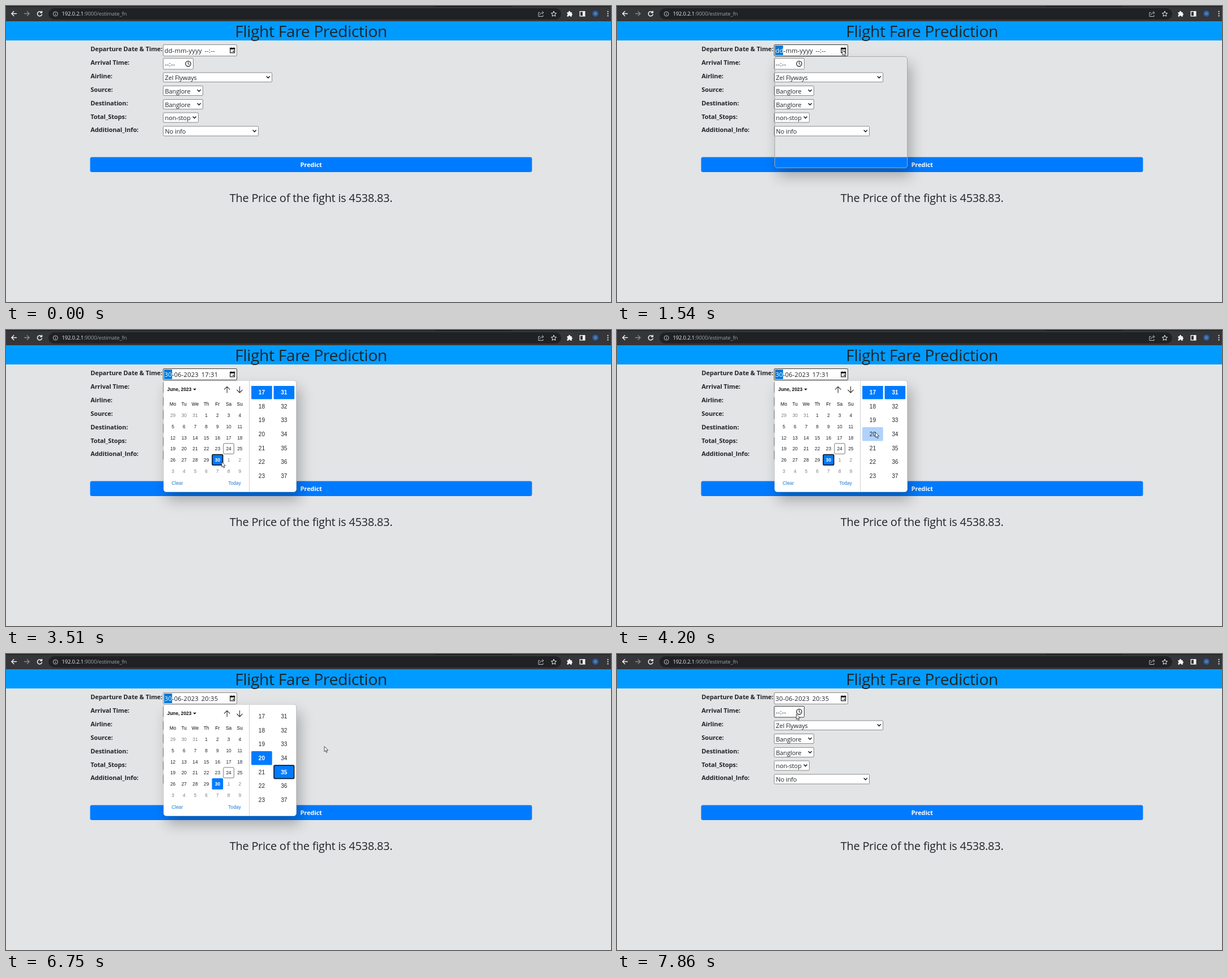
An HTML page for the animation above (8000 ms loop, 1068 by 524 pixels).

```html
<!DOCTYPE html>
<html lang="en">
<head>
<meta charset="utf-8">
<title>Flight Fare Prediction</title>
<style>
  html, body { margin: 0; width: 100%; height: 100%; overflow: hidden; background: #e3e4e6; }
  svg { display: block; width: 1068px; height: 524px; }
  text { font: 11px "Open Sans", "Noto Sans", sans-serif; letter-spacing: -.012em; fill: #212529; white-space: pre; }
  .bold { font-weight: 700; }
  .mid { text-anchor: middle; }
  .title { font-size: 28.2px; }
  .result { font-size: 19.9px; }
  .url { font-size: 9.5px; letter-spacing: -.02em; fill: #e8eaed; }
  .date { font-size: 11.2px; letter-spacing: .015em; }
  .cal { font: 8.4px "Liberation Sans", Arial, sans-serif; letter-spacing: 0; fill: #101010; }
  .time { font-size: 10px; }
  .cal.bold { font-weight: 700; }
  .line { fill: none; stroke-linecap: round; stroke-linejoin: round; }
  .panel { box-sizing: border-box; margin: 40px; width: 235px; height: 198px; border: 1px solid #a9a9a9;
           border-radius: 5px; box-shadow: 6px 14px 24px rgba(0, 0, 0, .27); }
</style>
</head>
<body>
<svg viewBox="0 0 1068 524">
  <defs>
    <clipPath id="lists"><rect x="430" y="99" width="82" height="173"/></clipPath>
    <radialGradient id="face"><stop offset="0" stop-color="#5d8fc9"/><stop offset="1" stop-color="#1d2c48"/></radialGradient>
  </defs>
  <g id="page"></g>
  <g id="scene"></g>
</svg>
<script>
const LOOP = 8000;
const BLUE = '#007bff';
const INK = '#212529';

const rect = (x, y, w, h, fill, extra = '') =>
  `<rect x="${x}" y="${y}" width="${w}" height="${h}" fill="${fill}" ${extra}/>`;
const text = (x, y, str, cls = '', fill = '') =>
  `<text x="${x}" y="${y}" class="${cls}" ${fill && `style="fill:${fill}"`}>${str}</text>`;
const line = (d, stroke, width = 1) =>
  `<path class="line" d="${d}" stroke="${stroke}" stroke-width="${width}"/>`;
const circle = (x, y, r, extra) => `<circle cx="${x}" cy="${y}" r="${r}" ${extra}/>`;

const labels = ['Departure Date &amp; Time:', 'Arrival Time:', 'Airline:', 'Source:',
                'Destination:', 'Total_Stops:', 'Additional_Info:'];

// Form controls: top, right edge, height, and the chosen option of a drop-down.
const fields = [
  { y: 68.5, right: 407.5, h: 20 },
  { y: 92.5, right: 330.5, h: 19.5 },
  { y: 118, right: 469.5, h: 16.5, option: 'Zel Flyways' },
  { y: 141.5, right: 347.5, h: 17, option: 'Banglore' },
  { y: 165.5, right: 347.5, h: 17, option: 'Banglore' },
  { y: 189, right: 339.5, h: 17, option: 'non-stop' },
  { y: 213, right: 445.5, h: 17, option: 'No info' },
];
const FIELD_X = 277.5;

// Pointer moves: start, end, number of steps, destination.
const START = [530, 320];
const moves = [
  [360, 530, 3, 440, 153],
  [770, 1140, 6, 398, 78],
  [1930, 2560, 9, 387.5, 223],
  [2630, 2710, 2, 370, 227],
  [3030, 3030, 1, 378, 233],
  [3510, 3740, 4, 396, 235],
  [3820, 4200, 6, 456, 181],
  [5040, 5360, 5, 486, 183],
  [5680, 5680, 1, 488, 203],
  [5740, 5740, 1, 489, 205],
  [6520, 6750, 4, 562, 163.5],
  [6910, 6910, 1, 563, 164],
  [7140, 7860, 10, 316.5, 106.5],
];

function pointerAt(t) {
  let [x, y] = START;
  for (const [start, end, steps, toX, toY] of moves) {
    if (t < start) break;
    const pitch = (end - start) / (steps - 1 || 1) || 1;
    const step = Math.min(steps, Math.floor((t - start) / pitch + 1e-6) + 1);
    const p = step / steps;
    const eased = p * p * (3 - 2 * p);
    x += (toX - x) * eased;
    y += (toY - y) * eased;
  }
  return { x, y };
}

function toolbar() {
  const white = '#f1f3f4', grey = '#8a8c8f';
  return rect(0, 0, 1068, 27, '#353639') + rect(0, 0, 1068, 1.2, '#1c1d1f') +
    rect(757, 0, 135, 1, '#08090a') +
    rect(75, 4, 905, 20, '#202124', 'rx="10"') +
    line('M18.5 13.5H10M13.8 9.6L9.8 13.5L13.8 17.4', white, 1.4) +
    line('M32.5 13.5H41M37.2 9.6L41.2 13.5L37.2 17.4', grey, 1.3) +
    line('M62.8 11.3A4.1 4.1 0 1 0 63.4 15M63.4 9.3V12H60.6', white, 1.5) +
    circle(87.3, 14, 4, 'fill="none" stroke="#bdc1c6"') +
    line('M87.3 13.8V16M87.3 12V12.1', '#bdc1c6') +
    `<text x="98.5" y="17.2" class="url">192.0.2.1<tspan fill="#9aa0a6">:9000/estimate_fn</tspan></text>` +
    line('M942 11.5H940V18.5H948V16.5M942.5 15.5Q943 11.8 948.6 11.8M946.6 9.6L949 11.8L946.6 14', '#bdc1c6') +
    line('M967 9.4L968.4 12.4L971.6 12.8L969.2 15L969.9 18.2L967 16.6L964.1 18.2L964.8 15L962.4 12.8L965.6 12.4Z', white) +
    `<path fill="${white}" d="M990.5 11H993V10.4A1.6 1.6 0 0 1 996.2 10.4V11H998.7V13.3A1.6 1.6 0 0 1 998.7 16.4V18.7H996.2A1.6 1.6 0 0 0 993 18.7H990.5V16.2A1.6 1.6 0 0 0 990.5 13.2Z"/>` +
    rect(1013.2, 9.7, 8.6, 8.2, 'none', `stroke="${white}" stroke-width="1.4"`) +
    rect(1018, 9.7, 4, 8.2, white) +
    circle(1040.5, 13.5, 7.5, 'fill="url(#face)"') +
    [9.8, 13.6, 17.4].map(y => circle(1062.5, y, 1.1, `fill="${white}"`)).join('');
}

function staticPage() {
  return rect(0, 0, 1068, 524, '#e3e4e6') + toolbar() +
    rect(0, 27, 1068, 34, '#009bff') +
    text(538.5, 55, 'Flight Fare Prediction', 'title mid') +
    labels.map((s, i) => text(149.3, 80 + 23.9 * i, s, 'bold')).join('') +
    text(538.5, 347.3, 'The Price of the fight is 4538.83.', 'result mid');
}

function form(t, pointer) {
  const boxes = fields.map((f, i) => {
    const over = pointer.x > FIELD_X && pointer.x < f.right && pointer.y > f.y && pointer.y < f.y + f.h;
    const active = i === 0 && t >= 1310 && t < 6520;
    const free = t < 1540 || t >= 6910;
    const border = active || (over && free && t >= 360) ? '#3c3c3c' : '#8a8a8a';
    const mid = f.y + f.h / 2, tip = f.right - 6.8;
    return rect(FIELD_X, f.y, f.right - FIELD_X, f.h, '#fff', `rx="1.5" stroke="${border}"`) +
      (f.option ? text(280.6, mid + 4.6, f.option) +
        line(`M${tip - 2.6} ${mid - 1.4}l2.6 2.7l2.6 -2.7`, '#111', 1.4) : '');
  }).join('');

  const filled = t >= 3260;
  const day = filled ? '30' : 'dd';
  const clock = filled ? `${t >= 4810 ? 20 : 17}:${t >= 6200 ? 35 : 31}` : '--:--';
  const selected = t >= 1310 && t < 6910;
  const dayStyle = selected ? ' style="fill:#fff"' : '';
  const dateField = (selected ? rect(279, 70, 14.2, 17, '#0078d7') : '') +
    text(279.8, 82.8, `<tspan${dayStyle}>${day}</tspan>${filled ? '-06-2023' : '-mm-yyyy'}`, 'date') +
    text(filled ? 344.8 : 350.5, 82.8, clock, 'date') +
    rect(395.8, 74.6, 7.8, 8.2, 'none', 'stroke="#111" stroke-width="1.2"') +
    rect(395.2, 74, 9, 2.8, '#111') + line('M397.2 73.5V74M402.2 73.5V74', '#111') +
    rect(400.3, 79.2, 2, 2, '#111');
  const arrival = text(280.3, 106.6, '--:--', 'date') +
    circle(321.6, 102.2, 4.6, 'fill="none" stroke="#111" stroke-width="1.2"') +
    line('M321.6 99.5V102.4L323.6 103.6', '#111');

  const shade = t >= 360 && t < 445 ? '#0069d9' : t >= 445 && t < 530 ? '#0072ec' : BLUE;
  return boxes + dateField + arrival +
    rect(148.5, 267.5, 780, 26.5, shade, 'rx="3"') +
    text(538.6, 285.2, 'Predict', 'bold mid', '#fff');
}

const near = (p, x, y, w, h) => Math.abs(p.x - x) < w / 2 && Math.abs(p.y - y) < h / 2;

function cell(x, y, w, h, str, { selected, focused, hover, today, muted, size = '' }) {
  const box = (fill, extra) => rect(x - w / 2, y - h / 2, w, h, fill, extra);
  const inset = stroke => rect(x - w / 2 + .6, y - h / 2 + .6, w - 1.2, h - 1.2, 'none', `rx="1.5" ${stroke}`);
  let back = '';
  if (selected) back = box(BLUE, 'rx="1.5"');
  else if (hover) back = box('#b0d2fb', 'rx="1.5"');
  if (focused) back += inset('stroke="#101010" stroke-width="1.5"');
  else if (today || (hover && !size && !selected)) back += inset('stroke="#767676" stroke-width="1"');
  const fill = selected ? '#fff' : muted ? '#808080' : INK;
  return back + text(x, y + (size ? 3.6 : 3.1), str, `cal mid ${size} ${selected ? 'bold' : ''}`, fill);
}

function timeList(x, first, chosen, focused, shift, pointer) {
  let out = '';
  for (let i = 0; i < 7; i++) {
    const y = 110.3 + shift + 24.65 * i, value = first + i;
    const selected = value === chosen;
    out += cell(x, y, 36.6, 24.6, value,
      { selected, focused: selected && focused, hover: near(pointer, x, y, 36.6, 24.6), size: 'time' });
  }
  return out;
}

function popup(t, pointer) {
  if (t < 1540 || t >= 6910) return '';
  const frame = '<foreignObject x="237.8" y="49" width="330" height="310"><div class="panel"></div></foreignObject>';
  if (t < 1620) return frame;

  const pitch = 19.7;
  const chosenDay = t < 3260 ? 24 : 30;
  const focus = t < 4580 ? 'day' : t < 5970 ? 'hour' : 'minute';
  let days = '';
  'Mo Tu We Th Fr Sa Su'.split(' ').forEach((name, i) => {
    days += text(294.5 + pitch * i, 134, name, 'cal mid');
  });
  for (let i = 0; i < 42; i++) {
    const n = i - 2, muted = n < 1 || n > 30;
    const label = n < 1 ? n + 31 : n > 30 ? n - 30 : n;
    const x = 294.6 + pitch * (i % 7), y = 151 + pitch * Math.floor(i / 7);
    const selected = n === chosenDay;
    days += cell(x, y, pitch, pitch, label, {
      selected, muted, today: n === 24, focused: selected && focus === 'day',
      hover: near(pointer, x, y, pitch, pitch),
    });
  }
  return frame + rect(278.3, 89.5, 234, 197, '#fff', 'rx="4.5"') +
    line('M429.5 90V286', '#d0d0d0') +
    text(284.6, 108, 'June, 2023', 'cal bold') +
    '<path d="M330.3 103.8H335.9L333.1 107Z" fill="#101010"/>' +
    line('M390.2 111V100.3M385.4 105.2L390.2 100.3L395 105.2', '#38282f', 1.1) +
    line('M412.5 100.3V111M407.7 106.1L412.5 111L417.3 106.1', '#38282f', 1.1) +
    days +
    text(292.3, 274.3, 'Clear', 'cal', '#1a79d0') + text(392.3, 274.3, 'Today', 'cal', '#1a79d0') +
    '<g clip-path="url(#lists)">' +
    timeList(451.4, 17, t < 4580 ? 17 : 20, focus === 'hour', 0, pointer) +
    timeList(490.8, 31, t < 5970 ? 31 : 35, focus === 'minute', t < 2630 ? 1.6 : 0, pointer) +
    '</g>';
}

function arrow(t, { x, y }) {
  if (t < 360) return '';
  return `<path transform="translate(${x} ${y})" d="M0 0V9.3L2.1 7.4L3.6 10.8L5.1 10.1L3.7 6.9H6.6Z"
    fill="#fff" stroke="#222" stroke-width=".8" stroke-linejoin="round"/>`;
}

const scene = document.getElementById('scene');
document.getElementById('page').innerHTML = staticPage();
let shown = '';

function render(t) {
  const pointer = pointerAt(t);
  const markup = form(t, pointer) + popup(t, pointer) + arrow(t, pointer);
  if (markup !== shown) scene.innerHTML = shown = markup;
}

const origin = performance.now();
function tick() {
  render((performance.now() - origin) % LOOP);
  requestAnimationFrame(tick);
}
tick();
</script>
</body>
</html>
```
